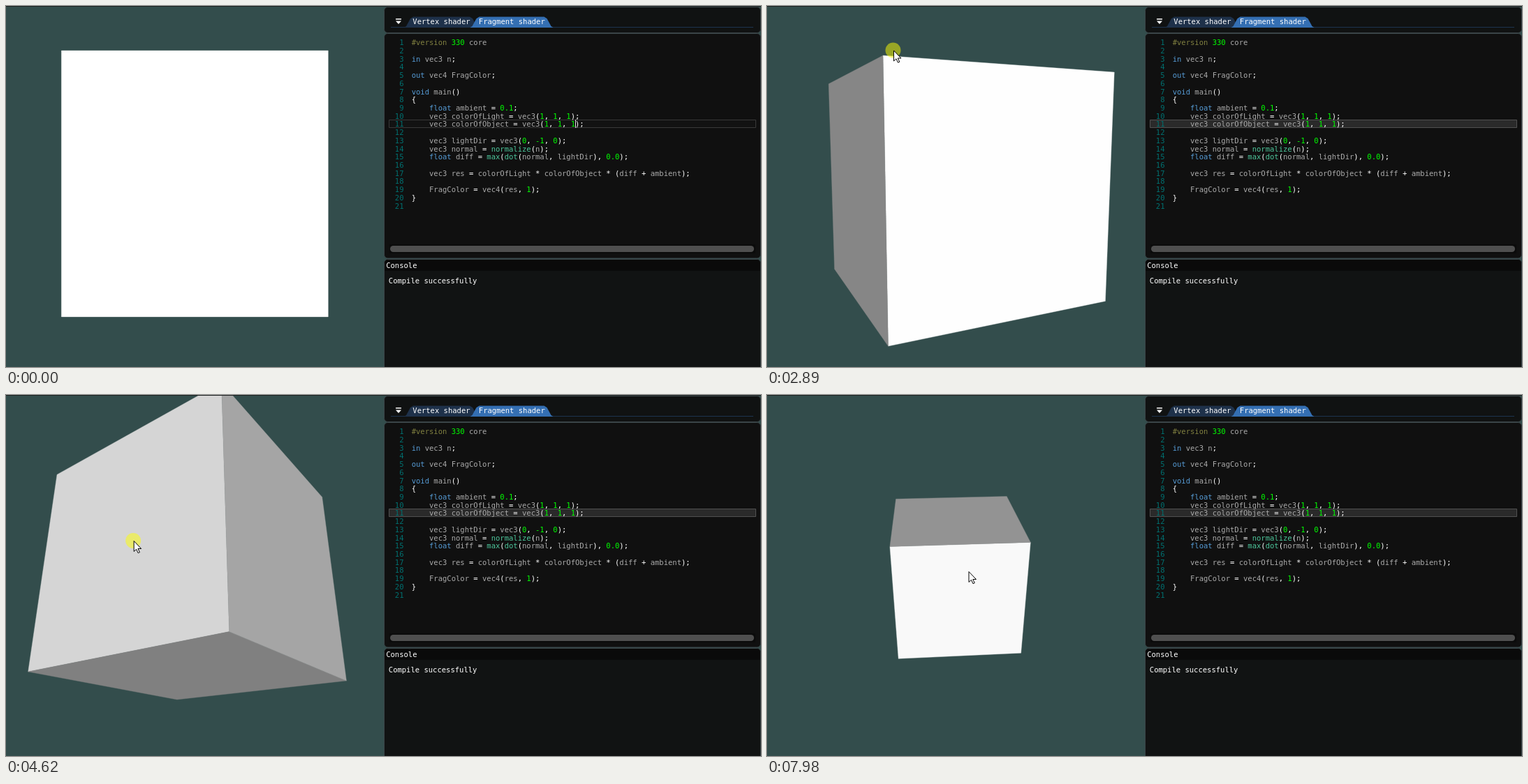
Write an HTML page with a canvas that moves like this. It is 1081 px wide and 518 px high and loops after 8000 ms.

```html
<!DOCTYPE html>
<html lang="en">
<head>
<meta charset="utf-8">
<title>Shader editor</title>
<style>
  html, body { margin: 0; width: 100%; height: 100%; overflow: hidden; background: #334d4c; }
  canvas { display: block; }
</style>
</head>
<body>
<canvas id="stage" width="1081" height="518"></canvas>
<script>
const ctx = document.getElementById('stage').getContext('2d');
const LOOP = 8000, CHAR = 6.333, LINE = 11.72;
const FONT = '10.52px "DejaVu Sans Mono", monospace';
const BACKGROUND = '#334d4c';

const CODE = `#version 330 core

in vec3 n;

out vec4 FragColor;

void main()
{
    float ambient = 0.1;
    vec3 colorOfLight = vec3(1, 1, 1);
    vec3 colorOfObject = vec3(1, 1, 1);

    vec3 lightDir = vec3(0, -1, 0);
    vec3 normal = normalize(n);
    float diff = max(dot(normal, lightDir), 0.0);

    vec3 res = colorOfLight * colorOfObject * (diff + ambient);

    FragColor = vec4(res, 1);
}
`.split('\n');

const TOKEN_COLORS = [
  [/^#/, '#808040'],
  [/^-?\d/, '#00ff00'],
  [/^(in|out|void|float)$/, '#569cd6'],
  [/^(normalize|max|dot)$/, '#4dc69b'],
  [/^\w/, '#aaaaaa'],
  [/./, '#ffffff'],
];

// The hand moves the mouse in straight strokes; dragging strokes also turn the cube.
const ENTRY = { x: 957, y: 522 };
const STROKES = [
  { from: 680, to: 1520, x: 93, y: 86 },
  { from: 1530, to: 1750, x: 68, y: 57 },
  { from: 2030, to: 2900, x: 181.5, y: 63.5, drag: true },
  { from: 3340, to: 4130, x: 181.5, y: 140, drag: true },
  { from: 4130, to: 4900, x: 182.5, y: 246.4, drag: true },
  { from: 5940, to: 6150, x: 166, y: 265 },
  { from: 6360, to: 6540, x: 162, y: 262 },
  { from: 6670, to: 7080, x: 197, y: 267.7, drag: true },
  { from: 7080, to: 7850, x: 287, y: 260.5, drag: true },
  { from: 7850, to: 7970, x: 288, y: 253 },
];
const DRAG_LAG = 75, DEGREES_PER_PIXEL = 1.11;

const isFocused = t => t < 1930;
const isPressed = t => (t >= 1930 && t < 5260) || (t >= 6540 && t < 7980);

// Nearly linear progress with slightly softened ends.
function progress(t, from, to) {
  const u = Math.max(0, Math.min(1, (t - from) / (to - from)));
  return u + 0.17 * (u * u * (3 - 2 * u) - u);
}

function travelled(t, dragOnly) {
  let previous = ENTRY, x = 0, y = 0;
  for (const stroke of STROKES) {
    if (stroke.drag || !dragOnly) {
      const p = progress(t, stroke.from, stroke.to);
      x += p * (stroke.x - previous.x);
      y += p * (stroke.y - previous.y);
    }
    previous = stroke;
  }
  return { x, y };
}

function polygon(points, fill, stroke, width = 1) {
  ctx.beginPath();
  points.forEach(([x, y]) => ctx.lineTo(x, y));
  ctx.closePath();
  ctx.fillStyle = fill;
  ctx.fill();
  if (stroke) {
    ctx.strokeStyle = stroke;
    ctx.lineWidth = width;
    ctx.stroke();
  }
}

function rect(x, y, w, h, color) {
  ctx.fillStyle = color;
  ctx.fillRect(x, y, w, h);
}

function roundBox(x, y, w, h, radius, fill, stroke) {
  ctx.beginPath();
  ctx.roundRect(x, y, w, h, radius);
  ctx.fillStyle = fill;
  ctx.fill();
  if (stroke) {
    ctx.strokeStyle = stroke;
    ctx.lineWidth = 1;
    ctx.stroke();
  }
}

function panel(y, height, fill) {
  roundBox(541.5, y, 539, height, 5, fill, '#3b4548');
}

function text(str, x, y, color = '#ffffff') {
  ctx.fillStyle = color;
  ctx.fillText(str, x, y);
}

function drawCube(t) {
  const dragged = travelled(t - DRAG_LAG, true);
  const radians = DEGREES_PER_PIXEL * Math.PI / 180;
  const yaw = -dragged.x * radians, pitch = dragged.y * radians;
  const distance = 2.21 + 1.02 * progress(t, 5550, 5710) + 0.68 * progress(t, 5910, 6150);
  const focal = 653;
  const cy = Math.cos(yaw), sy = Math.sin(yaw), cp = Math.cos(pitch), sp = Math.sin(pitch);

  const rotate = ([x, y, z]) => {
    const depth = z * cy - x * sy;
    return [x * cy + z * sy, y * cp - depth * sp, y * sp + depth * cp];
  };
  const project = ([x, y, z]) => {
    const scale = focal / (distance + z);
    return [270.3 + x * scale, 255 + y * scale];
  };

  for (let axis = 0; axis < 3; axis++) for (const side of [-1, 1]) {
    const onAxes = (a, b, c) => {
      const point = [];
      point[axis] = a;
      point[(axis + 1) % 3] = b;
      point[(axis + 2) % 3] = c;
      return rotate(point);
    };
    const facing = -onAxes(side, 0, 0)[2];
    // Keep only the faces that look at the camera.
    if (facing * distance <= 0.5) continue;
    const corners = [[-1, -1], [1, -1], [1, 1], [-1, 1]]
      .map(([b, c]) => project(onAxes(side / 2, b / 2, c / 2)));
    const gray = Math.round(255 * Math.min(1, facing + 0.1));
    const color = `rgb(${gray},${gray},${gray})`;
    polygon(corners, color, color, 0.4);
  }
}

function drawTabs() {
  panel(1.5, 37, '#101212');
  rect(558, 18, 8, 1.5, '#ffffff');
  polygon([[558, 21.5], [566, 21.5], [562, 26]], '#ffffff');
  rect(551, 30, 519, 1, '#1d344f');
  const tab = (label, left, right, color) => {
    polygon([
      [left, 31], [left + 3, 29], [left + 9, 18], [left + 13, 15.5],
      [right - 13, 15.5], [right - 9, 18], [right - 3, 29], [right, 31],
    ], color);
    text(label, left + 12.3, 26);
  };
  tab('Vertex shader', 570, 677, '#1e314a');
  tab('Fragment shader', 664.5, 783.5, '#346fb3');
}

function drawEditor(t) {
  panel(39.5, 322.5, '#101010');
  const [fill, border] = isFocused(t) ? ['#121212', '#393939'] : ['#2a2a2a', '#505050'];
  roundBox(548.5, 163.5, 525, 11, 0, fill, border);
  CODE.forEach((line, row) => {
    const y = 56.2 + row * LINE;
    const number = String(row + 1);
    text(number, 569.5 - number.length * CHAR, y, '#007070');
    for (const { 0: token, index } of line.matchAll(/#\w+|-?\d[\d.]*|\w+|\S/g)) {
      const color = TOKEN_COLORS.find(([pattern]) => pattern.test(token))[1];
      text(token, 580.7 + index * CHAR, y, color);
    }
  });
  const caretOn = isFocused(t) && Math.floor((t + 255) / 365) % 2 === 0;
  if (caretOn) rect(815, 163, 1, 12, '#e0e0e0');
  rect(549, 342, 524, 13, '#0b0b0b');
  roundBox(550, 344, 521, 9, 4.5, '#4f4f4f');
}

function drawConsole() {
  panel(363.5, 165, '#111313');
  roundBox(542, 364, 538, 16, [5, 5, 0, 0], '#0a0a0a');
  text('Console', 544.2, 376);
  text('Compile successfully', 547.8, 397.8);
}

function drawPointer(t) {
  const offset = travelled(t, false);
  const x = ENTRY.x + offset.x, y = ENTRY.y + offset.y;
  if (isPressed(t)) {
    ctx.beginPath();
    ctx.arc(x, y, 11, 0, 2 * Math.PI);
    ctx.fillStyle = 'rgba(255,255,0,0.5)';
    ctx.fill();
  }
  const arrow = [[0, 0], [0, 15], [3.5, 11.8], [6, 17.2], [8.3, 16.2], [5.8, 11], [10.5, 11]];
  polygon(arrow.map(([dx, dy]) => [x + 1 + dx, y + 0.5 + dy]), '#ffffff', '#000000');
}

function drawFrame(t) {
  ctx.font = FONT;
  rect(0, 0, 1081, 518, BACKGROUND);
  drawCube(t);
  rect(541, 1, 540, 517, BACKGROUND);
  drawTabs();
  drawEditor(t);
  drawConsole();
  rect(0, 0, 1081, 1, '#1c2020');
  if (t >= 700) drawPointer(t);
}

const start = performance.now();
function tick() {
  drawFrame((performance.now() - start) % LOOP);
  requestAnimationFrame(tick);
}
tick();
</script>
</body>
</html>
```
